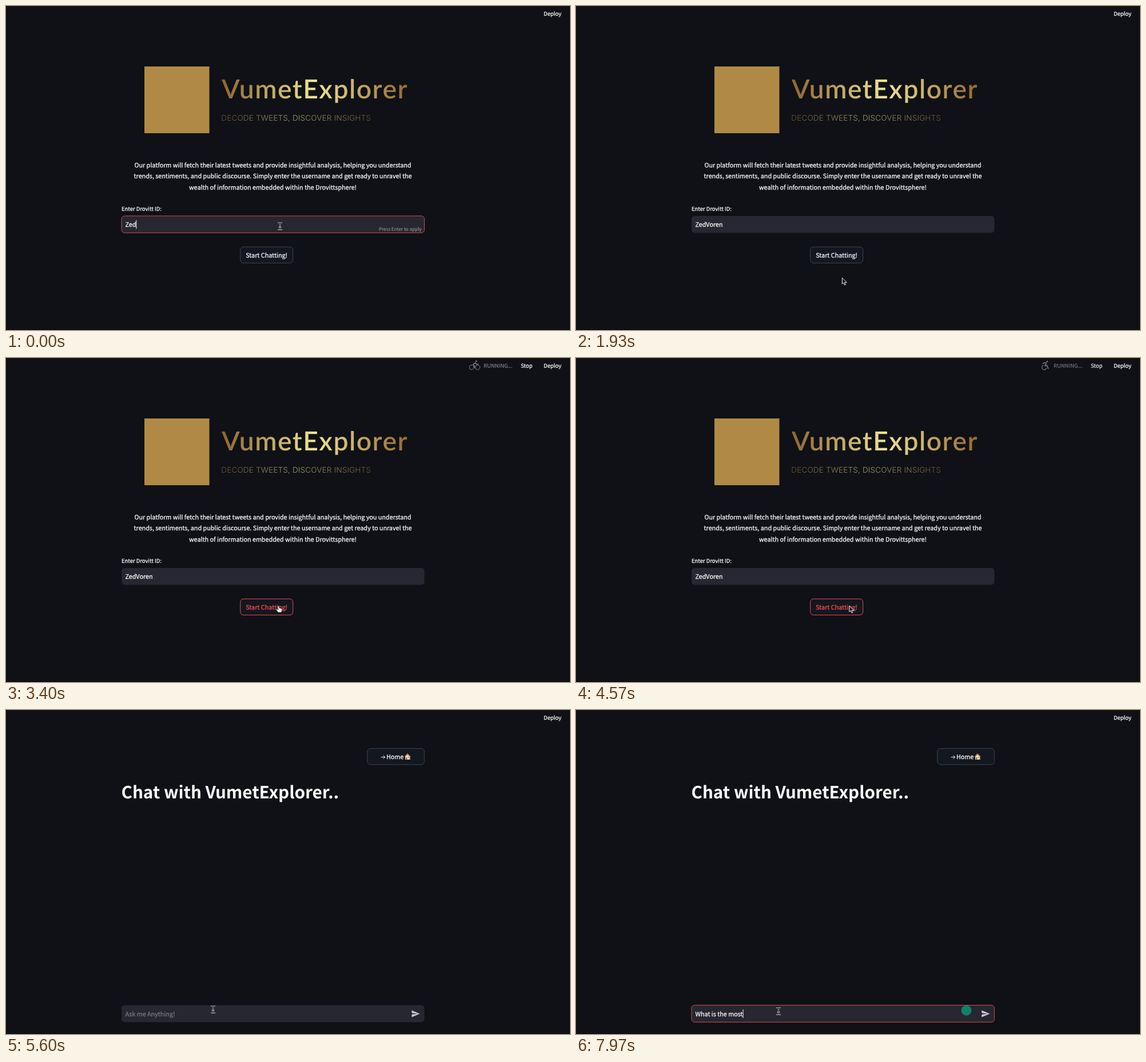
An HTML page for the animation above (8000 ms loop, 986 px wide and 568 px high).

```html
<!DOCTYPE html>
<html lang="en">
<head>
<meta charset="utf-8">
<title>Chat demo</title>
<style>
  html, body { margin: 0; width: 100%; height: 100%; overflow: hidden; background: #0f1116; }
  svg { display: block; }
  text {
    font: 10.78px "Noto Sans CJK JP", "Noto Sans CJK SC", "Noto Sans CJK", sans-serif;
    color: #fafafa; fill: currentColor; stroke: currentColor; stroke-width: .28px;
    white-space: pre; text-rendering: geometricPrecision;
  }
  .small { font-size: 9.43px; }
  .hint { font-size: 8.08px; color: #8d8e94; stroke-width: .15px; text-anchor: end; }
  .muted { color: #85868b; stroke-width: .15px; }
  .mid { text-anchor: middle; }
  .title { font-size: 29.6px; font-weight: 700; stroke: none; }
  .brand { font: 600 46px Lato, sans-serif; letter-spacing: 1.6px; fill: url(#gold); stroke: none; }
  .tagline { font: 300 13.5px Inter, sans-serif; letter-spacing: .19px; fill: url(#dimGold); stroke: none; }
  .field { fill: #262730; }
  .focus .field { stroke: #d9464a; }
  .button rect { fill: #131720; stroke: #41444c; }
  .hover rect { stroke: #f0484a; }
  .hover text { color: #ff4b4b; }
  .caret { fill: #fafafa; }
  .line { fill: none; stroke: #7d7f85; stroke-linecap: round; stroke-linejoin: round; }
</style>
</head>
<body>
<svg width="986" height="568" viewBox="0 0 986 568">
  <defs>
    <linearGradient id="gold" gradientUnits="userSpaceOnUse" x1="378" x2="702" y1="0" y2="0">
      <stop stop-color="#8f6431"/><stop offset=".5" stop-color="#efe492"/><stop offset="1" stop-color="#95692f"/>
    </linearGradient>
    <linearGradient id="dimGold" gradientUnits="userSpaceOnUse" x1="377" x2="637" y1="0" y2="0">
      <stop stop-color="#69512f"/><stop offset=".5" stop-color="#aaa16d"/><stop offset="1" stop-color="#69512f"/>
    </linearGradient>
  </defs>
  <rect width="986" height="568" fill="#0f1116"/>
  <rect y="567" width="986" height="1" fill="#08090c"/>

  <text class="small" x="940" y="16.8">Deploy</text>
  <g id="running">
    <g id="bike" class="line">
      <circle cx="814" cy="16.4" r="4"/><circle cx="824.6" cy="16.4" r="4"/>
      <path d="M819.3 17.5V14L816.6 11.5L820.2 8.2L822.3 10.8H825.5" stroke-width="1.5"/>
      <circle cx="822" cy="5.7" r="1" fill="#7d7f85"/>
    </g>
    <g id="wheel" class="line">
      <path d="M817.2 12.5A4.1 4.1 0 1 0 822.5 17.5" stroke-width="1.3"/>
      <path d="M816.5 9.5L819.5 8L822.3 9.2L819.8 13.5H823.8L825.5 18.5" stroke-width="1.8"/>
      <circle cx="823.6" cy="6.3" r="1.1" fill="#7d7f85"/>
    </g>
    <text class="small muted" x="835" y="16.8">RUNNING...</text>
    <text class="small" x="900" y="16.8">Stop</text>
  </g>

  <g id="home">
    <rect x="242" y="106" width="113.5" height="117" fill="#b08a45"/>
    <text class="brand" x="377" y="162">VumetExplorer</text>
    <text class="tagline" x="376.3" y="200.6">DECODE TWEETS, DISCOVER INSIGHTS</text>
    <text class="mid" x="466.5" y="283.2">Our platform will fetch their latest tweets and provide insightful analysis, helping you understand</text>
    <text class="mid" x="466.5" y="302.4">trends, sentiments, and public discourse. Simply enter the username and get ready to unravel the</text>
    <text class="mid" x="466.5" y="321.6">wealth of information embedded within the Drovittsphere!</text>
    <text class="small" x="202" y="359.3">Enter Drovitt ID:</text>
    <g id="nameBox">
      <rect class="field" x="202" y="368" width="529.5" height="29.7" rx="5.5"/>
      <text class="typed" x="208.5" y="387"></text>
      <rect class="caret" y="375.5" width="1" height="15"/>
      <text class="hint" x="726.5" y="394">Press Enter to apply</text>
    </g>
    <g id="start" class="button">
      <rect x="409.7" y="422.3" width="92" height="28.3" rx="5.5"/>
      <text class="mid" x="455.6" y="440.7">Start Chatting!</text>
    </g>
  </g>

  <g id="chat">
    <g class="button">
      <rect x="631.8" y="67.5" width="99.5" height="28.3" rx="5.5"/>
      <path d="M656 82.7H662.5M659.8 80L662.5 82.7L659.8 85.4" class="line" style="stroke:#fafafa"/>
      <text x="665" y="85.8">Home</text>
      <path d="M698 81.5L702 77.5L706.3 81.5V87H698Z" fill="#efdfbd"/>
      <path d="M696.3 81.8L701.8 75.8L707.8 81.8L706.6 82.6L701.9 78.3L697.5 82.6Z" fill="#c2694b"/>
      <path d="M699.3 83H701.3V87H699.3Z" fill="#8a5637"/>
      <path d="M703 82.3H705V84.3H703Z" fill="#6c9cc0"/>
      <path d="M704.5 87A1.6 1.6 0 0 1 707.7 87Z" fill="#6d9845"/>
    </g>
    <text class="title" x="201.5" y="154.8">Chat with VumetExplorer..</text>
    <g id="chatBox">
      <rect class="field" x="202" y="517.5" width="529.5" height="29.7" rx="5.5"/>
      <text id="placeholder" x="208.5" y="536.7">Ask me Anything!</text>
      <text class="typed" x="208.5" y="536.7"></text>
      <rect class="caret" y="525" width="1" height="15"/>
      <circle id="badge" cx="682.5" cy="526.7" r="9" fill="#12806c"/>
      <path id="send" transform="translate(708 524.5) scale(.667)" d="M2 21L23 12L2 3V10L17 12L2 14Z"/>
    </g>
  </g>

  <g id="pointer" stroke-linejoin="round" stroke-linecap="round">
    <g id="ibeam" fill="none">
      <path d="M-3 -6Q0 -6 0 -4Q0 -6 3 -6M0 -4V4M-3 6Q0 6 0 4Q0 6 3 6M-1.3 1.5H1.3" stroke="#c6c6c9" stroke-width="2.2"/>
      <path d="M-3 -6Q0 -6 0 -4Q0 -6 3 -6M0 -4V4M-3 6Q0 6 0 4Q0 6 3 6" stroke="#17181d"/>
    </g>
    <path id="arrow" d="M0 0V10.2L2.4 8.1L4.2 12.2L6 11.4L4.3 7.5H7.6Z" fill="#0b0b0d" stroke="#f2f2f2"/>
    <path id="hand" d="M-1.4 .4Q0 -.9 1 .6L1.5 3.8L5 4.5Q6.5 5 6.1 7.3L5 11.4H-.8L-4.2 6.9Q-4.6 5.3 -3 5.6L-.9 7Z" fill="#f4f4f4" stroke="#0b0b0d" stroke-width=".6"/>
  </g>
</svg>
<script>
const LOOP = 8000, TICK = 147.3, OFFSET = 1470;
const $ = selector => document.querySelector(selector);
const show = (selector, on) => { $(selector).style.display = on ? "" : "none"; };

const NAME = "ZedVoren", QUESTION = "What is the most";
// Each entry: [tick, number of typed characters]
const nameKeys = [[-99, 3], [-7, 4], [-5, 5], [-4, 6], [-3, 8]];
const chatKeys = [[-99, 0], [31, 1], [32, 2], [33, 3], [34, 4], [35, 5], [36, 6], [37, 8],
  [38, 9], [39, 10], [40, 12], [41, 13], [42, 14], [43, 15], [44, 16]];
// Each entry: [tick, x, y]
const path = [[-99, 479, 386], [-1, 479, 386], [0, 478, 398], [1, 472, 435], [2, 466, 477],
  [5, 464, 477], [6, 459, 466], [7, 455, 450], [8, 460, 447], [11, 472, 438], [15, 481, 431],
  [16, 481, 435], [17, 481, 435], [18, 478, 435], [19, 478, 435], [20, 477.8, 434.8],
  [24, 477.8, 434.8], [25, 468, 445], [26, 438, 471], [27, 400, 502], [28, 362, 525],
  [29, 354, 528], [99, 354, 528]];
const pointerKeys = [[-99, "ibeam"], [1, "hand"], [2, "arrow"], [7, "hand"], [20, "arrow"], [28, "ibeam"]];

const held = (keys, n) => keys.filter(key => key[0] <= n).pop()[1];

function position(n) {
  const i = path.findIndex(key => key[0] > n);
  const [n0, x0, y0] = path[i - 1], [n1, x1, y1] = path[i];
  const p = (n - n0) / (n1 - n0);
  return [x0 + (x1 - x0) * p, y0 + (y1 - y0) * p];
}

function type(box, text, focused) {
  const typed = $(box + " .typed");
  typed.textContent = text;
  $(box).classList.toggle("focus", focused);
  show(box + " .caret", focused);
  $(box + " .caret").setAttribute("x", 208.5 + (text ? typed.getComputedTextLength() : 0));
}

function draw() {
  const n = Math.floor((performance.now() % LOOP - OFFSET) / TICK);
  const chatting = n >= 22;
  show("#home", !chatting);
  show("#chat", chatting);

  show("#running", n >= 5 && n < 14 || n >= 20 && n < 23);
  $("#running").style.opacity = n === 22 ? .72 : n === 21 ? .88 : 1;
  const cycling = n < 14 ? n % 2 === 1 : n % 2 === 0;
  show("#bike", cycling);
  show("#wheel", !cycling);

  if (chatting) {
    const question = QUESTION.slice(0, held(chatKeys, n));
    type("#chatBox", question, n >= 29);
    show("#placeholder", !question);
    $("#placeholder").style.color = n < 23 ? "#494a53" : "#777880";
    $("#send").style.fill = n < 23 ? "#9c9da6" : "#c8c9d0";
    show("#badge", n >= 30);
  } else {
    type("#nameBox", NAME.slice(0, held(nameKeys, n)), n < 3);
    show("#nameBox .hint", n < 3);
    $("#start").classList.toggle("hover", n === 1 || n >= 8);
  }

  const kind = held(pointerKeys, n);
  for (const id of ["ibeam", "arrow", "hand"]) show("#" + id, id === kind);
  $("#pointer").setAttribute("transform", `translate(${position(n)})`);
  requestAnimationFrame(draw);
}
draw();
</script>
</body>
</html>
```
